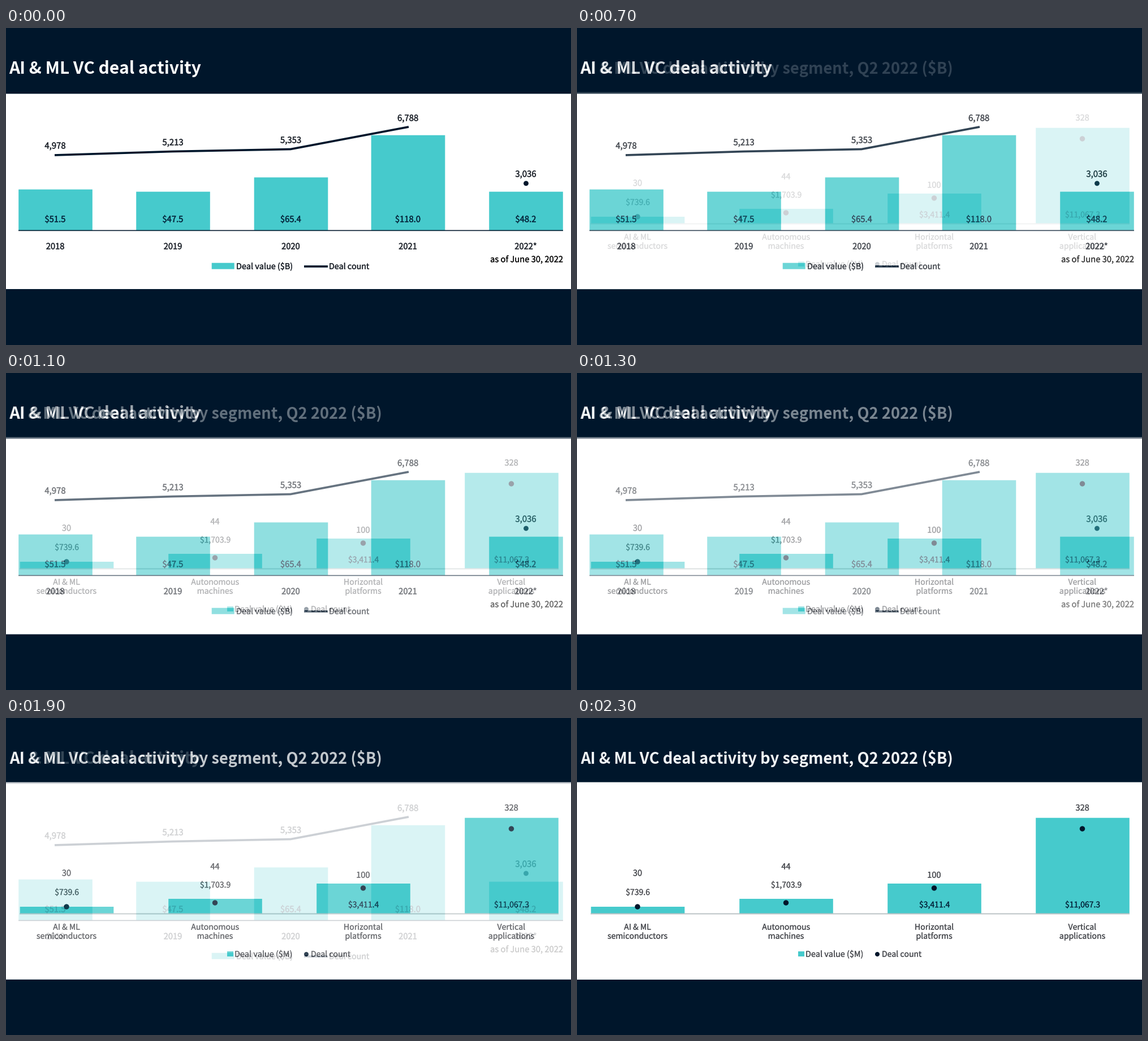
Write a matplotlib script that moves like this. It is 999 px wide and 561 px high and loops after 8 s.

```python
import numpy as np
import matplotlib.pyplot as plt
from matplotlib.animation import FuncAnimation
from matplotlib.patches import Circle, Rectangle
from matplotlib.patheffects import withStroke

W, H, DPI = 999, 561, 64
PT = 72 / DPI  # points per pixel
FRAMES, STEP = 80, 100

NAVY, TEAL, WHITE = "#00162b", "#46cacc", "#ffffff"
INK, GREY, RULE = "#22272f", "#4c4e53", "#bcc4c6"
ON_BAR, SOFT_WHITE = "#06293f", "#f2f4f6"

plt.rcParams["font.family"] = ["Noto Sans CJK JP", "DejaVu Sans"]
fig = plt.figure(figsize=(W / DPI, H / DPI), dpi=DPI, facecolor=NAVY)


def box(ax, x0, y0, x1, y1, color):
    ax.add_patch(Rectangle((x0, y0), x1 - x0, y1 - y0, fc=color, lw=0,
                           snap=False))


def dot(ax, x, y, r):
    ax.add_patch(Circle((x, y), r, fc=NAVY, lw=0, zorder=3))


def line(ax, xs, ys, width, color=NAVY):
    ax.plot(xs, ys, color=color, lw=width * PT, solid_capstyle="butt",
            solid_joinstyle="round", snap=False, zorder=2)


def text(ax, x, y, s, size=14, color=INK, ha="center", weight="normal",
         stroke=0.0):
    """Place text so that the middle of its capitals sits at y."""
    label = ax.text(x, y + 0.366 * size, s, size=size * PT, color=color,
                    ha=ha, va="baseline", weight=weight, parse_math=False,
                    zorder=4)
    if stroke:
        label.set_path_effects([withStroke(linewidth=stroke * PT,
                                           foreground=color)])


def yearly(ax):
    box(ax, 0, 116.4, W, 462, WHITE)
    text(ax, 5, 70.5, "AI & ML VC deal activity", 29.8, WHITE, "left", "bold")

    centers = [87.5, 295.5, 504, 711, 919.5]
    tops = [285.7, 289.7, 264.4, 189.7, 289.7]
    values = ["$51.5", "$47.5", "$65.4", "$118.0", "$48.2"]
    counts = ["4,978", "5,213", "5,353", "6,788", "3,036"]
    count_y = [208, 202, 198, 159, 258]
    years = ["2018", "2019", "2020", "2021", "2022*"]
    bold = dict(stroke=0.4)
    for x, top, value, count, y, year in zip(
            centers, tops, values, counts, count_y, years):
        box(ax, x - 65.3, top, x + 65.3, 358, TEAL)
        text(ax, x - 0.5, 338, value, 14.8, ON_BAR, **bold)
        text(ax, x - 0.5, y, count, 14.9, **bold)
        text(ax, x - 0.5, 386, year, 14.7, **bold)

    line(ax, [22, 985], [358.4, 358.4], 1.6)
    line(ax, [86, 295, 503, 712], [225, 218.5, 214.5, 175], 3.7)
    dot(ax, 919.5, 275, 4.4)
    text(ax, 920.5, 409, "as of June 30, 2022", 14.7, "#080808", stroke=0.2)

    box(ax, 363.7, 415.7, 403.7, 426.7, TEAL)
    text(ax, 407, 421.5, "Deal value ($B)", 14.4, ha="left", **bold)
    line(ax, [527, 569], [422, 422], 3.7)
    text(ax, 571, 421.5, "Deal count", 14.2, ha="left", **bold)


def by_segment(ax):
    box(ax, 0, 113.6, W, 463, WHITE)
    text(ax, 6, 71, "AI & ML VC deal activity by segment, Q2 2022 ($B)",
         27.33, SOFT_WHITE, "left", "bold")

    centers = [107.5, 370, 632, 894]
    tops = [334, 320, 293, 176.7]
    dots = [334, 327, 301, 196]
    counts = [("30", 274), ("44", 262.5), ("100", 277.5), ("328", 158.5)]
    values = [("$739.6", 308, GREY), ("$1,703.9", 295, GREY),
              ("$3,411.4", 330, ON_BAR), ("$11,067.3", 330, ON_BAR)]
    names = [("AI & ML", "semiconductors"), ("Autonomous", "machines"),
             ("Horizontal", "platforms"), ("Vertical", "applications")]
    bold = dict(stroke=0.25)
    line(ax, [24, 977], [346.5, 346.5], 2, RULE)
    for x, top, y, count, value, name in zip(
            centers, tops, dots, counts, values, names):
        box(ax, x - 82.8, top, x + 82.8, 346, TEAL)
        dot(ax, x - 0.5, y, 4.7)
        text(ax, x - 0.5, count[1], count[0], 14.6, GREY, **bold)
        text(ax, x, value[1], value[0], 14, value[2], **bold)
        for row, part in enumerate(name):
            text(ax, x - 0.5, 369.5 + 16 * row, part, 14.1, GREY, **bold)

    box(ax, 391, 413, 402, 422, TEAL)
    text(ax, 404, 417.5, "Deal value ($M)", 14.4, GREY, "left", **bold)
    dot(ax, 531, 418, 4)
    text(ax, 539, 417.5, "Deal count", 14, GREY, "left", **bold)


def render(slide):
    fig.clear()
    ax = fig.add_axes([0, 0, 1, 1])
    ax.set(xlim=(0, W), ylim=(H, 0))
    ax.axis("off")
    slide(ax)
    fig.canvas.draw()
    return np.array(fig.canvas.buffer_rgba())[..., :3].astype(float)


first, second = render(yearly), render(by_segment)
fig.clear()
stage = fig.figimage(first / 255, origin="upper")


def update(i):
    # Dissolve in ten even steps, one every 200 ms from 500 ms on
    mix = min(max((i * STEP - 300) // 200, 0), 10) / 10
    blend = (1 - mix) * first + mix * second
    stage.set_data(np.rint(blend).astype(np.uint8))
    return [stage]


anim = FuncAnimation(fig, update, frames=FRAMES, interval=STEP, repeat=True)
plt.show()
```
